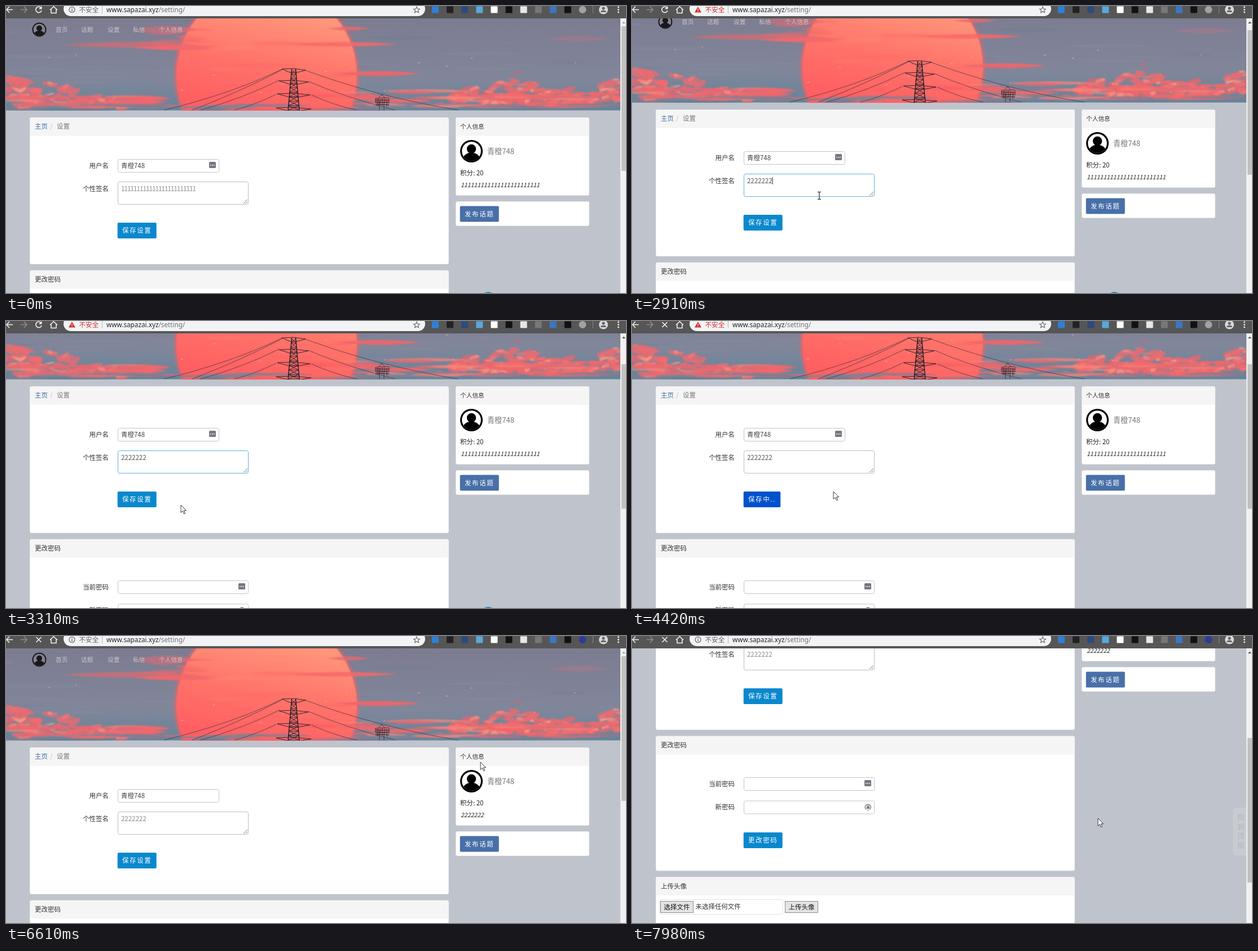
These frames come from a looping animation (1099 by 510 pixels, 8000 ms). An HTML page:

```html
<!DOCTYPE html>
<html lang="zh-CN">
<head>
<meta charset="utf-8">
<title>设置</title>
<style>
html, body { margin: 0; width: 100%; height: 100%; overflow: hidden; background: #bfc4cc; }
svg { display: block; font-family: "Noto Sans CJK SC", "Noto Sans CJK", "Noto Sans", sans-serif; }
.url { font-family: "Noto Sans", sans-serif; }
.ones { letter-spacing: -.87px; }
.button { letter-spacing: 1.6px; font-weight: 500; }
</style>
</head>
<body>
<svg id="stage" width="1099" height="510" viewBox="0 0 1099 510"></svg>
<script>
const LOOP = 8000, NAME = '青橙748', ONES = '1'.repeat(24), TWOS = '2'.repeat(7);
const SIZE = 11.48;

let seed = 77;
const random = (a = 0, b = 1) => {
  seed = seed * 16807 % 2147483647;
  return a + (b - a) * seed / 2147483647;
};
const repeat = (n, make) => Array.from({ length: n }, (_, i) => make(i)).join('');
const pick = list => list[Math.floor(random(0, list.length))];

// Basic shapes; text is centred vertically on cy.
const rect = (x, y, w, h, fill, extra = '') =>
  `<rect x="${x}" y="${y}" width="${w}" height="${h}" fill="${fill}" ${extra}/>`;
const circle = (x, y, r, fill, extra = '') =>
  `<circle cx="${x}" cy="${y}" r="${r}" fill="${fill}" ${extra}/>`;
const line = (d, stroke, width = 1, extra = '') =>
  `<path d="${d}" fill="none" stroke="${stroke}" stroke-width="${width}" ${extra}/>`;
const shape = (d, fill, extra = '') => `<path d="${d}" fill="${fill}" ${extra}/>`;
const text = (x, cy, string, fill = '#333', size = SIZE, extra = '') =>
  `<text x="${x}" y="${cy + size * .37}" fill="${fill}" font-size="${size}" ${extra}>${string}</text>`;

// Page parts
const card = (x, y, w, h, header = 33) =>
  rect(x + .5, y + .5, w - 1, h - 1, '#fff', 'rx="2.5" stroke="#e9ebee"') +
  (header ? shape(`M${x + .5} ${y + header}v${3 - header}q0-2.5 3-2.5h${w - 7}q3 0 3 2.5v${header - 3}z`, '#f5f5f5') : '');
const field = (x, y, w, h, id = '') =>
  rect(x + .5, y + .5, w - 1, h - 1, '#fff', `rx="3" stroke="#c4c4c4" ${id}`);
const label = (cy, string) => text(182, cy, string, '#333', SIZE, 'text-anchor="end"');
const button = (x, y, string, fill, id = '') =>
  rect(x - .3, y, 69, 28, fill, `rx="2" id="${id}Box"`) +
  text(x + 8, y + 14, string, '#fff', SIZE, `class="button" id="${id}Text"`);
const plainButton = (x, string) =>
  rect(x + .5, 763.5, 58, 20, '#e4e4e4', 'stroke="#8c8c8c"') + text(x + 6.5, 773.5, string, '#111');
const keyIcon = (x, y, id = '') => `<g ${id}>${rect(x, y, 12, 11, '#777782', 'rx="1.5"')}` +
  [2, 5, 8].map(d => rect(x + d, y + 5, 1.6, 1.6, '#fff')).join('') + '</g>';
const avatar = (x, y, r, back, ink) =>
  `<g transform="translate(${x} ${y}) scale(${r / 20})">` +
  circle(0, 0, 20, ink) + circle(0, 0, 16.8, back) + circle(0, -4, 8.2, ink) +
  shape('M-14 9.5Q-10 4-4 3H4Q10 4 14 9.5A16.9 16.9 0 0 1-14 9.5z', ink) + '</g>';

// Painted sunset
const lens = (x, y, w, h, fill, opacity = 1) =>
  shape(`M${x} ${y}q${w / 2} ${-h} ${w} 0q${-w / 2} ${h} ${-w} 0z`, fill, `opacity="${opacity}"`);
const streaks = (n, x0, x1, y0, y1, colors, length = 90, opacity = .8) => repeat(n, () =>
  lens(random(x0, x1) - length / 2, random(y0, y1), random(.4, 1.3) * length, random(2, 8), pick(colors), opacity));
const strokes = (n, cx, base, halfWidth, height, colors, size) => repeat(n, () => {
  const u = random(-1, 1), x = cx + u * halfWidth, y = base - random(.05, 1) * height * (1 - u * u);
  return `<ellipse rx="${random(.8, 2.4) * size}" ry="${random(.35, .8) * size}" fill="${pick(colors)}" opacity=".75"
    transform="translate(${x} ${y}) rotate(${random(-35, 20)})"/>`;
});
const cloud = (cx, base, halfWidth, height) =>
  strokes(24, cx, base, halfWidth, height, ['#ee6a70', '#f76a6b', '#cf6c77'], 8) +
  strokes(22, cx, base, halfWidth * .9, height * 1.05, ['#f98a7d', '#f0787a', '#ff9c86', '#c5697a'], 4.5);

function pylon() {
  const half = y => 3.5 + (y - 112) * .09;
  const lattice = repeat(9, i => {
    const y = 113 + i * 8, z = y + 8, a = half(y), b = half(z);
    return `M${510 - a} ${y}L${510 + b} ${z}M${510 + a} ${y}L${510 - b} ${z}M${510 - b} ${z}H${510 + b}`;
  });
  const arms = [[112, 21], [133, 26], [156, 29], [181, 31]].map(([y, w]) =>
    `M${510 - w} ${y}L510 ${y - 1}L${510 + w} ${y + 2}M${510 - w} ${y}L503 ${y + 6}H517L${510 + w} ${y + 2}`).join('');
  const wires = 'M490 112Q400 156 280 185M490 113Q420 150 330 185M484 132Q420 164 345 185M479 157Q440 176 405 185' +
    'M530 114Q660 162 802 185M536 134Q600 162 690 185M541 158Q580 176 622 185';
  const mast = repeat(7, i => `M${655 + i * 4} ${164 + i % 3}v${8 + i % 2 * 5}M655 ${164 + i * 2}l24 ${i % 2 ? 2 : -1}`);
  return line(wires, '#3a3343', .7) + line(lattice + arms, '#1d1f29', .9) +
    line('M506.5 112L500 186M513.5 112L520 186', '#171923', 1.4) +
    line(mast + 'M660 164l6-7l6 7M662 170V185M670 170V185', '#2c2934', .8);
}

function banner() {
  const reds = ['#f4686b', '#f96468', '#df6a73'];
  return `<g clip-path="url(#bannerClip)">` + rect(0, 22, 1089, 164, 'url(#sky)') +
    `<g filter="url(#soften)">` +
    streaks(26, 0, 1089, 30, 150, ['#8b8b9d', '#747c94', '#85899d'], 150, .4) +
    circle(462, 123, 167, 'url(#glow)') + circle(462, 123, 160, 'url(#sun)') +
    lens(100, 69, 240, 10, '#d96b73', .7) + lens(225, 74, 170, 9, '#f3696c', .9) +
    lens(230, 42, 110, 14, '#d96d76', .6) +
    streaks(7, 250, 360, 42, 76, reds, 80, .5) +
    streaks(9, 340, 580, 50, 115, ['#ff7a6c', '#ff6a66', '#ff8572'], 110, .5) +
    lens(500, 68, 195, 8, '#f8686a', .85) + lens(570, 40, 75, 7, '#ec686d', .8) +
    lens(960, 58, 110, 10, '#a9788a', .6) + lens(585, 120, 150, 8, '#fa6568', .9) +
    streaks(5, 590, 690, 112, 130, reds, 80, .6) +
    cloud(12, 176, 50, 52) + cloud(85, 180, 60, 42) + cloud(165, 180, 55, 20) +
    cloud(905, 174, 65, 55) + cloud(830, 176, 60, 30) + cloud(970, 174, 60, 28) + cloud(1078, 172, 45, 40) +
    streaks(26, 0, 300, 160, 182, [...reds, '#f4877c'], 120) +
    streaks(34, 640, 1089, 150, 180, [...reds, '#f4877c'], 140) +
    streaks(10, 330, 590, 140, 184, ['#ff6264', '#ff7068', '#f45c63'], 120, .5) +
    streaks(24, 0, 1089, 173, 186, ['#6b879b', '#5d7f95', '#8a7b8f'], 140, .7) + '</g>' +
    repeat(18, () => lens(random(0, 1089), random(85, 155), random(2, 6), 2, '#f0a597', .7)) +
    pylon() + '</g>';
}

function page() {
  return banner() + avatar(59, 42, 12.5, '#85838f', '#17171d') +
    [[88, '首页'], [133, '话题'], [180, '设置'], [225, '私信'], [271, '个人信息']]
      .map(([x, string]) => text(x, 42.5, string, '#c8c6ca', 10.7)).join('') +
    card(42, 198, 743, 261) + text(51, 214, '主页', '#3f6da5') + text(78, 214, '/', '#bbb') + text(90, 214, '设置', '#777') +
    label(283.5, '用户名') + field(198, 272, 180, 24) + text(204, 284, NAME, '#444') + keyIcon(360, 277, 'id="nameIcon"') +
    label(324.5, '个性签名') + field(198, 312, 232, 41, 'id="bioBox"') + line('M421 351l7-7M425 351l3-3', '#777') +
    text(204, 324.5, '', '#555', SIZE, 'id="bio"') + rect(0, 318, 1, 13, '#222', 'id="caret"') +
    button(198, 385, '保存设置', '#0a88cd', 'save') +
    card(42, 469.5, 743, 240) + text(51, 485.5, '更改密码') +
    label(555, '当前密码') + field(198, 543, 232, 24) + keyIcon(412, 548) +
    label(596, '新密码') + field(198, 584.5, 232, 24) +
    line('M415.5 600.5A5 5 0 1 1 421 600.5M418.5 600.5v2', '#777', 1.4) + rect(416, 595, 5, 4, '#777') +
    line('M417 595v-1.5h3v1.5', '#777') +
    button(198, 641, '更改密码', '#0a88cd') +
    card(42, 720, 743, 120) + text(51, 736.5, '上传头像') +
    rect(49.5, 760.5, 218, 26, '#fff', 'stroke="#e2e2e2" rx="2"') +
    plainButton(50, '选择文件') + text(112.5, 772.5, '未选择任何文件') + plainButton(271, '上传头像') +
    card(797, 198, 237, 139) + text(805, 214.5, '个人信息', '#333', 10.7) + avatar(825, 258, 20, '#fff', '#000') +
    text(853, 258, NAME, '#777', 13.1) + text(805, 297, '积分: 20', '#222') +
    text(806, 318.5, '', '#222', 10.5, 'font-style="italic" id="signature"') +
    card(797, 347, 237, 44, 0) + button(805, 355.5, '发布话题', '#486fa8');
}

function toolbar() {
  const white = '#f1f1f1';
  const icons = ['#2f7fd8', '#222', '#2c4a7c', '#58a9dc', '#fff', '#111', '#e8e8e8', '#777', '#3b76c4', '#111'];
  return rect(0, 0, 1099, 22, '#565656') + rect(102, -8, 641, 26, '#f1f3f4', 'rx="13"') +
    line('M12 6.5H1M6 1L1 6.5L6 12', white, 1.6) + line('M26 6.5H37M32 1L37 6.5L32 12', '#8d8d8d', 1.6) +
    `<g id="reload">${line('M62 3A5.2 5.2 0 1 0 63 8', white, 1.6) + shape('M63.5 0v5.5h-5.5z', white)}</g>` +
    line('M53.5 2l9 9M62.5 2l-9 9', white, 1.6, 'id="stop"') +
    line('M78 7L84.5 1L91 7M80 6V12.5H89V6', white, 1.6) +
    `<g id="info">${circle(117, 6.5, 5, 'none', 'stroke="#5f6368" stroke-width="1.2"')}${rect(116.3, 5.5, 1.4, 4, '#5f6368')}${rect(116.3, 3, 1.4, 1.4, '#5f6368')}</g>` +
    `<g id="warning">${shape('M117 1.2L123 11.5H111z', '#d3302f')}${rect(116.4, 5, 1.2, 3, '#fff')}${rect(116.4, 9, 1.2, 1.2, '#fff')}</g>` +
    text(129.5, 6.5, '不安全', '#5f6368', 11.6, 'id="insecure"') + rect(170, 0, 1, 13, '#b5b7ba') +
    text(178, 6.3, 'www.sapazai.xyz<tspan fill="#6f7378">/setting/</tspan>', '#25282c', 11.75, 'class="url"') +
    line('M728 1.5l1.6 3.5l3.8.4l-2.9 2.5l.9 3.8l-3.4-2l-3.4 2l.9-3.8l-2.9-2.5l3.8-.4z', '#5f6368', 1.1) +
    icons.map((fill, i) => rect(755 + i * 26.1, .5, 12, 12, fill, 'rx="1"')).join('') +
    circle(1022, 6.5, 6.5, '#a2a2a2', 'id="badge"') + rect(1040, 0, 1, 13, '#888') +
    circle(1059, 6.5, 8, '#d8dade') + circle(1059, 4, 2.6, '#666') + shape('M1054 11q0-3.5 5-3.5t5 3.5z', '#666') +
    [2, 6.5, 11].map(y => circle(1085.5, y, 1.4, white)).join('');
}

const stage = document.getElementById('stage');
stage.innerHTML = `<defs>
  <clipPath id="bannerClip">${rect(0, 22, 1089, 163.5, '#000')}</clipPath>
  <filter id="soften" x="0" y="0" width="1" height="1"><feGaussianBlur stdDeviation=".8"/></filter>
  <linearGradient id="sky" x2="0" y2="1"><stop stop-color="#7c7c91"/><stop offset=".65" stop-color="#81869a"/><stop offset="1" stop-color="#64849a"/></linearGradient>
  <linearGradient id="sun" x1=".6" x2=".4" y2="1"><stop offset=".15" stop-color="#ff967b"/><stop offset=".45" stop-color="#ff7269"/><stop offset=".75" stop-color="#ff5d61"/></linearGradient>
  <radialGradient id="glow"><stop offset=".95" stop-color="#f85e63" stop-opacity=".8"/><stop offset="1" stop-color="#f85e63" stop-opacity="0"/></radialGradient>
  </defs>` + rect(0, 0, 1099, 510, '#bfc4cc') +
  circle(855, 522, 14, '#2b86bd', 'id="bubble"') + `<g id="page">${page()}</g>` +
  `<g id="toTop">${shape('M1089 305h-16q-8 0-8 8v69q0 8 8 8h16z', '#c7cbd2')}${[...'回到顶部'].map((c, i) => text(1073, 323 + i * 16.4, c, '#b0b5be', 12)).join('')}</g>` +
  rect(1089, 22, 10, 488, '#f1f1f1') + rect(1091, 36, 8, 257, '#c1c1c1', 'id="thumb"') +
  shape('M1092 31l3-3.5l3 3.5z', '#505050', 'id="arrowUp"') + toolbar() +
  shape('M0 0V13.5L3.2 10.6L5.5 15.8L7.6 14.9L5.3 9.8H9.6z', '#fff', 'id="arrow" stroke="#222" stroke-width=".9"') +
  line('M-3-6.5h2.2l.8.8l.8-.8H3M0-6V6M-3 6.5h2.2l.8-.8l.8.8H3', '#111', 1.1, 'id="beam"');

const el = Object.fromEntries([...stage.querySelectorAll('[id]')].map(node => [node.id, node]));
const show = (node, on) => node.setAttribute('visibility', on ? 'visible' : 'hidden');
const set = (node, name, value) => node.setAttribute(name, value);
const write = (node, string) => { if (node.textContent !== string) node.textContent = string; };

const SCROLL = [[0, 0], [2910, 14], [2990, 40], [3070, 64], [3180, 82], [6610, 0], [7410, 190], [7560, 245], [7880, 262], [7980, 292]];
const KEYS = [1650, 1730, 1950, 2190, 2360, 2520, 2600];
const POINTER = [[390, 718, 467], [800, 450, 350], [1120, 322, 322], [1230, 340, 321], [1810, 343, 321], [2040, 343, 323],
  [2190, 338, 323], [2520, 338, 323], [2750, 334, 337], [3070, 331, 337], [3180, 328, 330], [3610, 270, 320], [3800, 236, 316],
  [4000, 236, 316], [4190, 290, 312], [4420, 356, 303], [4970, 901, 244], [5350, 901, 244], [5440, 895, 244], [5600, 893, 243],
  [6070, 841, 224], [6860, 841, 224], [7050, 908, 262], [7260, 850, 330], [7730, 850, 330], [7980, 826, 324]];

const stepAt = (steps, t) => steps.findLast(([start]) => t >= start)[1];
function pointerAt(t) {
  const next = POINTER.findIndex(([time]) => time > t);
  if (next <= 0) return POINTER.at(next).slice(1);
  const [t0, x0, y0] = POINTER[next - 1], [t1, x1, y1] = POINTER[next];
  const k = (t - t0) / (t1 - t0);
  return [x0 + (x1 - x0) * k, y0 + (y1 - y0) * k].map(Math.round);
}

function render(t) {
  const scroll = stepAt(SCROLL, t), barScroll = t >= 7410 && t < 7560 ? 0 : scroll;
  const typed = KEYS.filter(time => t >= time).length;
  const saving = t >= 3880 && t < 6610, reloaded = t >= 6610;
  const focused = t >= 1230 && t < 3880, warned = t >= 1650 && t < 4500;

  set(el.page, 'transform', `translate(0 ${-scroll})`);
  set(el.thumb, 'y', 36 + barScroll * .497);
  set(el.arrowUp, 'fill', barScroll ? '#505050' : '#a3a3a3');

  write(el.bio, typed ? TWOS.slice(0, typed) : ONES);
  set(el.bio, 'class', typed ? '' : 'ones');
  set(el.bio, 'fill', typed && !reloaded ? '#555' : '#8c8c8c');
  set(el.bioBox, 'stroke', focused ? '#62aee3' : '#bdbdbd');
  set(el.caret, 'x', 204 + (typed ? el.bio.getComputedTextLength() : 0));
  show(el.caret, focused && (t - (KEYS[typed - 1] ?? 1230)) % 1060 < 530);
  write(el.signature, reloaded ? TWOS : ONES);

  write(el.saveText, saving ? '保存中..' : '保存设置');
  set(el.saveBox, 'fill', saving ? '#0052cc' : '#0a88cd');
  set(el.saveBox, 'width', saving ? 65.5 : 69);
  show(el.nameIcon, t < 6610 || t >= 7730);

  show(el.warning, warned);
  show(el.info, !warned);
  set(el.insecure, 'fill', warned ? '#d3302f' : '#5f6368');
  show(el.reload, t < 3880);
  show(el.stop, t >= 3880);
  set(el.badge, 'fill', t < 4500 ? '#a2a2a2' : '#2c3c98');
  show(el.bubble, t < 3610);
  show(el.toTop, t >= 7980);

  const [x, y] = pointerAt(t), beam = t >= 1000 && t < 3180;
  for (const node of [el.arrow, el.beam]) set(node, 'transform', `translate(${x} ${y})`);
  show(el.beam, beam);
  show(el.arrow, t >= 390 && !beam);
}

const start = performance.now();
function frame() {
  render((performance.now() - start) % LOOP);
  requestAnimationFrame(frame);
}
frame();
</script>
</body>
</html>
```
